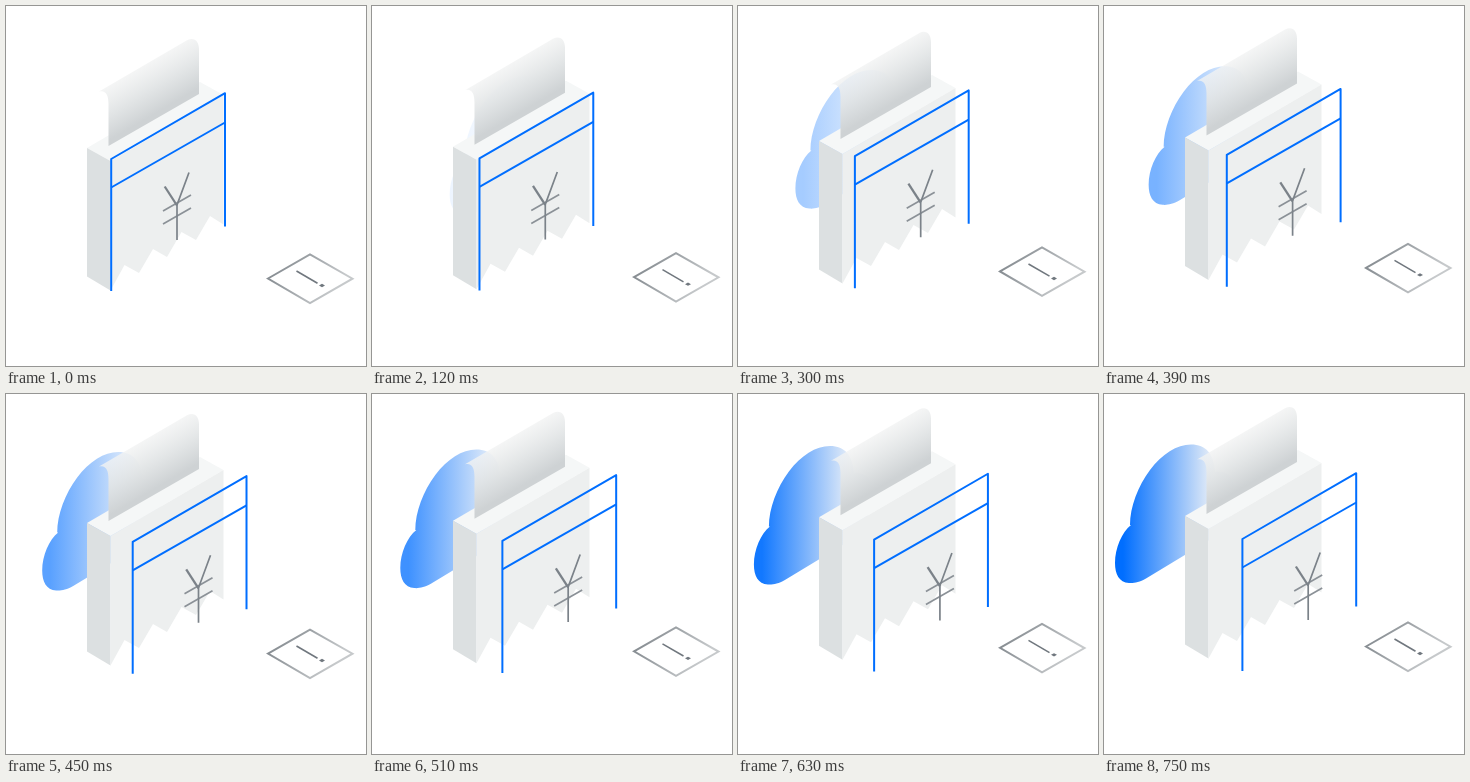
An HTML page for the animation above (1.5 s loop, 360x360 px).

```html
<!DOCTYPE html>
<html lang="en">
<head>
<meta charset="utf-8">
<title>Receipt</title>
<style>
  html, body { margin: 0; width: 100%; height: 100%; overflow: hidden; background: #fff; }
  svg { display: block; width: 100%; height: 100%; }
</style>
</head>
<body>
<svg viewBox="0 0 360 360" fill="none">
  <defs>
    <linearGradient id="sky" gradientUnits="userSpaceOnUse" x1="19" y1="0" x2="109" y2="0">
      <stop offset="0" stop-color="#006eff"/>
      <stop offset="1" stop-color="#e9eff7"/>
    </linearGradient>
    <linearGradient id="sheet" gradientUnits="userSpaceOnUse" x1="138" y1="59" x2="162" y2="100">
      <stop offset="0" stop-color="#f2f3f3" stop-opacity=".8"/>
      <stop offset=".5" stop-color="#e1e4e5" stop-opacity=".93"/>
      <stop offset="1" stop-color="#ced2d4"/>
    </linearGradient>
    <linearGradient id="rim" gradientUnits="userSpaceOnUse" x1="275" y1="255" x2="325" y2="290">
      <stop offset="0" stop-color="#888e93"/>
      <stop offset="1" stop-color="#c6c9cb"/>
    </linearGradient>
  </defs>

  <g id="cloud">
    <path fill="url(#sky)" d="M26 131C26 113 34 92 46 76C58 60 73 50.5 87 50.5
      C102 50.5 110 60 111 78C124 76 132 86 130 102C128 120 118 138 104 147
      L42 184.500C35 188.500 30 189.300 25 189C15 188.500 11 180 11 169C11 154 18 138 27 131Z"/>
  </g>

  <g id="box">
    <path fill="#f5f7f7" d="M81 142L194 76L217.500 89L104.500 155Z"/>
    <path fill="#dce0e1" d="M81 142L104.500 155V284.500L81 270.500Z"/>
    <path fill="#edefef" d="M104.500 155L217.500 89V218.500L204 210L190 234L175.500 226
      L161 251L147 243L133 267L118.500 259L104.500 284.500Z"/>
    <path fill="url(#sheet)" d="M93 85.500L181 34.200C188 30.500 193 35 193 43V88
      L102.500 140V98C102.500 89 100 84 93 85.500Z"/>
  </g>

  <g id="alert">
    <path stroke="url(#rim)" stroke-width="2" d="M262 272.500L304 248.500L346.500 272.700L304 297Z"/>
    <path stroke="#70777e" stroke-width="1.600" d="M290.500 265L311.500 277.200"/>
    <path fill="#70777e" d="M313 279.500L316 277.800L319 279.500L316 281.200Z"/>
  </g>

  <g id="front">
    <g stroke="#006eff" stroke-width="2" stroke-linejoin="round">
      <path d="M105.200 285V153L219 87.200V220.500"/>
      <path d="M105.200 181.500L219 116.500"/>
    </g>
    <g stroke="#7b8289" stroke-width="1.700">
      <path stroke="#8b9197" d="M157 205L185 189M157 218L185 202"/>
      <path d="M183 166.500L171 199V234"/>
      <path stroke-width="2.300" d="M158.700 180.500L171 199.500"/>
    </g>
  </g>
</svg>
<script>
  const LOOP = 1500, MOVE = 750, STEP = 30;
  const part = id => document.getElementById(id);
  const cloud = part('cloud'), box = part('box'), alertSign = part('alert'), front = part('front');
  const shift = (el, x, y) => el.setAttribute('transform', `translate(${x.toFixed(2)} ${y.toFixed(2)})`);
  const smooth = s => s * s * (3 - 2 * s);

  function draw(time) {
    const t = Math.floor(time % LOOP / STEP) * STEP;
    const p = smooth(Math.min(t / MOVE, 1));
    shift(box, 0, -20 * p);
    shift(alertSign, 0, -20 * p);
    shift(front, 33.2 * p, -8 * p);
    shift(cloud, 71.6 * (1 - p), 21 * (1 - p));
    cloud.setAttribute('opacity', p.toFixed(3));
  }

  const start = performance.now();
  function tick() {
    draw(performance.now() - start);
    requestAnimationFrame(tick);
  }
  tick();
</script>
</body>
</html>
```
